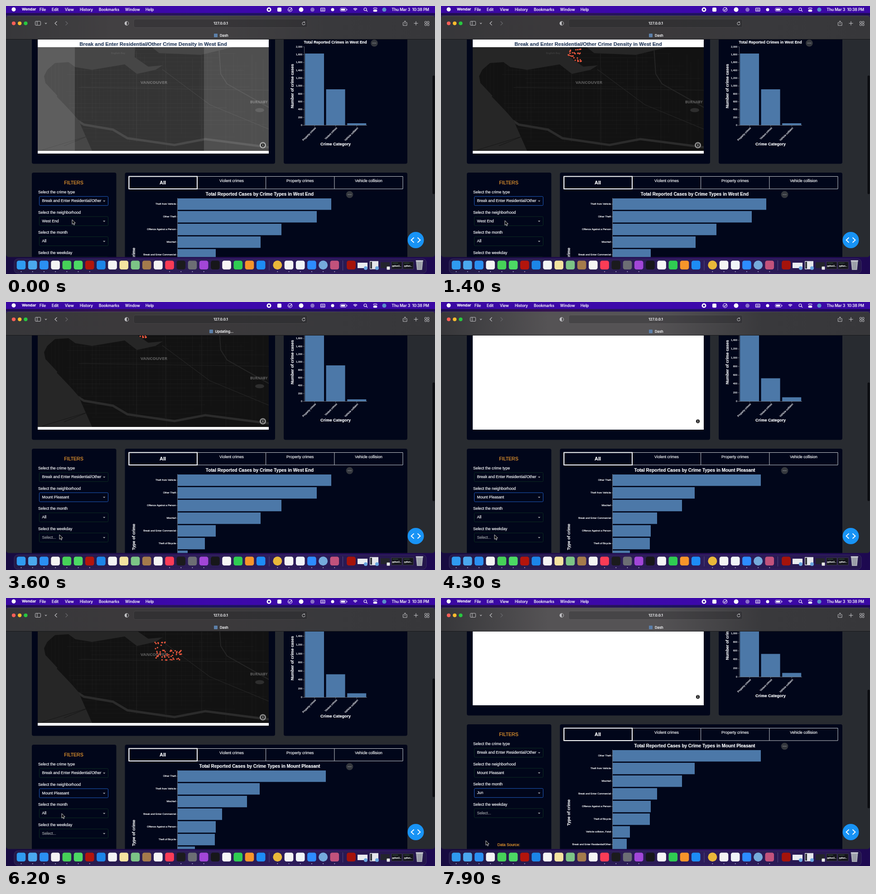
Recreate the animation shown at these times as an HTML page with a canvas. Size 947 by 592 pixels, loop 8000 ms.

```html
<!DOCTYPE html>
<html lang="en">
<head>
<meta charset="utf-8">
<title>Crime dashboard</title>
<style>
  html, body { margin: 0; width: 100%; height: 100%; overflow: hidden; background: #1c0f52; }
  canvas { display: block; width: 947px; height: 592px; }
</style>
</head>
<body>
<canvas id="stage"></canvas>
<script>
const W = 947, H = 592, LOOP = 8000;
const SANS = '"Liberation Sans", Arial, sans-serif', UI = 'Inter, Roboto, sans-serif';
const BAR = '#4c78a8', PANEL = '#01061a', ORANGE = '#f5a030', INK = '#f4f5f7', AXIS = '#85888f';
const canvas = document.getElementById('stage'), c = canvas.getContext('2d');
const dpr = window.devicePixelRatio || 1;
canvas.width = W * dpr;
canvas.height = H * dpr;

// ---------- helpers ----------
const clamp = v => Math.min(1, Math.max(0, v));
const ease = v => { v = clamp(v); return v * v * (3 - 2 * v); };
function text(s, x, y, size, o = {}) {
  c.save();
  c.translate(x, y);
  c.rotate(o.turn || 0);
  c.font = `${o.weight || 400} ${size}px ${o.font || SANS}`;
  c.textAlign = o.align || 'left';
  c.textBaseline = 'middle';
  c.fillStyle = c.strokeStyle = o.color || INK;
  c.lineWidth = .22; // slightly heavier glyphs
  c.lineJoin = 'round';
  c.fillText(s, 0, 0);
  c.strokeText(s, 0, 0);
  c.restore();
}
const title = (s, x, y, size, o) => text(s, x, y, size, { weight: 700, align: 'center', ...o });
function rect(x, y, w, h, fill, r = 0) {
  c.fillStyle = fill;
  c.beginPath();
  c.roundRect(x, y, w, h, r);
  c.fill();
}
function frame(x, y, w, h, color, lw = 1, r = 0) {
  c.strokeStyle = color;
  c.lineWidth = lw;
  c.beginPath();
  c.roundRect(x, y, w, h, r);
  c.stroke();
}
function disc(x, y, r, fill) {
  c.fillStyle = fill;
  c.beginPath();
  c.arc(x, y, r, 0, 7);
  c.fill();
}
function ring(x, y, r, color, lw = 1, a = 0, b = 6.2832) {
  c.strokeStyle = color;
  c.lineWidth = lw;
  c.beginPath();
  c.arc(x, y, r, a, b);
  c.stroke();
}
function trace(pts) {
  c.beginPath();
  for (let i = 0; i < pts.length; i += 2) c.lineTo(pts[i], pts[i + 1]);
}
function line(pts, color, lw = 1) {
  trace(pts);
  c.strokeStyle = color;
  c.lineWidth = lw;
  c.stroke();
}
function shape(pts, fill) {
  trace(pts);
  c.closePath();
  c.fillStyle = fill;
  c.fill();
}
function clip(x, y, w, h, r = 0) {
  c.save();
  c.beginPath();
  c.roundRect(x, y, w, h, r);
  c.clip();
}
function blend(x0, x1, ...colors) {
  const g = c.createLinearGradient(x0, 0, x1, 0);
  colors.forEach((k, i) => g.addColorStop(i / (colors.length - 1), k));
  return g;
}
function random(seed) {
  return () => (seed = (seed * 16807) % 2147483647) / 2147483647;
}

// ---------- timeline ----------
const OPEN_HOOD = 1700, PICK_HOOD = 3500, NEW_BARS = 3900, NEW_TOTALS = 4100, NEW_MAP = 4200,
  OPEN_MONTH = 6300, PICK_MONTH = 7600, CLEAR_MAP = 7800;
const within = (t, a, b) => t >= a && t < b;
const hoodAt = (t, change) => t < change ? 'West End' : 'Mount Pleasant';
const scrollAt = t => t < OPEN_HOOD ? 0 : t < OPEN_MONTH ? 44 : 89;

// each move: start, end, x, y
const MOVES = [[700, 1400, 141, 474], [1900, 2200, 136, 486], [2500, 3300, 118, 514],
  [5500, 6200, 123, 476], [6700, 7200, 99, 536]];
function cursorAt(t) {
  let x = 146, y = 472;
  for (const [a, b, tx, ty] of MOVES) {
    const k = ease((t - a) / (b - a));
    x += (tx - x) * k;
    y += (ty - y) * k;
  }
  return [x, y];
}
// white veil over map tiles that take `span` ms to appear
function veil(t, span) {
  const shown = t < NEW_MAP ? -337 : t < CLEAR_MAP ? NEW_MAP + 100 : LOOP;
  return clamp(1 - (t - shown) / span);
}

// ---------- data ----------
const HOODS = ['West End', 'Central Business District', 'Grandview-Woodland', 'Mount Pleasant',
  'Strathcona', 'Kensington-Cedar Cottage'];
const MONTHS = 'All Jan Feb Mar Apr May Jun Jul Aug'.split(' ');
const THEFT = 'Theft from Vehicle', OTHER = 'Other Theft', PERSON = 'Offence Against a Person',
  HARM = 'Mischief', SHOP = 'Break and Enter Commercial', BIKE = 'Theft of Bicycle',
  FATAL = 'Vehicle collision, Fatal', HOME = 'Break and Enter Residential/Other';
const AREAS = {
  'West End': {
    types: [THEFT, OTHER, PERSON, HARM, SHOP, BIKE, HOME, FATAL],
    bars: [339, 307, 229, 183, 84, 60, 22, 16],
    max: 2000, totals: [1827, 916, 52]
  },
  'Mount Pleasant': {
    types: [OTHER, THEFT, HARM, SHOP, PERSON, BIKE, FATAL, HOME],
    bars: [327, 181, 153, 98, 84, 82, 38, 31],
    max: 1800, totals: [1758, 529, 93]
  }
};
function scatter(seed, n, x, y, w, h, inside) {
  const rnd = random(seed), out = [];
  while (out.length < n) {
    const u = rnd(), v = rnd();
    if (inside(u, v)) out.push([x + u * w, y + v * h]);
  }
  return out;
}
const DOTS = {
  'West End': scatter(41, 30, 281, 95, 29, 33, (u, v) => v < .55 + u * .5),
  'Mount Pleasant': scatter(23, 58, 329, 141, 59, 40, (u, v) => v > .45 || u < .12 || (u < .38 && v < .3))
};

// ---------- map ----------
const LAND = [84, 155, 91, 141, 108, 126, 138, 124, 153, 135, 190, 141, 262, 129, 289, 150, 330, 141,
  346, 131, 314, 134, 284, 113, 285, 91, 322, 91, 338, 104, 430, 108, 500, 91, 580, 91, 580, 320,
  190, 320, 160, 252, 118, 203, 87, 170];
function city() {
  rect(70, 91, 510, 229, '#262626');
  line([113, 199, 160, 248], '#131313', 3);
  line([80, 318, 182, 287, 128, 309], '#181818', 1.2);
  c.save();
  shape(LAND, '#121212');
  c.clip();
  const rnd = random(7), street = () => `rgba(255,255,255,${.015 + rnd() * .035})`;
  for (let x = 92; x < 580; x += 8.2) {
    const y = 92 + rnd() * 50;
    line([x, y, x, y + 110 + rnd() * 90], street(), .8);
  }
  for (let y = 96; y < 318; y += 9.2) line([130 + rnd() * 60, y, 400 + rnd() * 190, y], street(), .8);
  for (const x of [288, 352, 432]) line([x, 100, x, 300], '#202020');
  line([160, 180, 580, 186], '#222', 1.2);
  line([345, 140, 450, 218, 580, 272], '#242424', 1.2);
  line([470, 91, 474, 150, 488, 172, 580, 224], '#252525', 2);
  line([150, 248, 172, 262, 236, 273, 268, 292, 372, 307, 440, 294, 580, 312], '#2b2b2b', 5);
  c.restore();
  c.fillStyle = '#2e2e2e';
  c.beginPath();
  c.ellipse(560, 230, 10, 4.5, 0, 0, 7);
  c.fill();
  const label = { font: '"Open Sans", sans-serif', weight: 700, color: '#585858' };
  text('VANCOUVER', 297, 169.5, 9.6, label);
  text('BURNABY', 539, 212.5, 7.9, label);
  text('English Bay', 232, 105, 5.5, { ...label, color: '#3a3a3a' });
}
function mapCard(t) {
  const hood = hoodAt(t, NEW_MAP);
  rect(70, 40, 510, 286, '#fff');
  title(`${HOME} Crime Density in ${hood}`, 325, 85.2, 11.15, { color: '#2a3f5f' });
  clip(70, 91, 510, 229);
  city();
  const edges = [70, 152, 437, 580];
  for (let i = 0; i < 3; i++)
    rect(edges[i], 91, edges[i + 1] - edges[i], 229, `rgba(255,255,255,${veil(t, i === 1 ? 395 : 455)})`);
  if (within(t, 400, NEW_MAP) || within(t, NEW_MAP + 300, CLEAR_MAP))
    for (const [x, y] of DOTS[hood]) disc(x, y, 1.6, '#ee583e');
  disc(567, 307.5, 7, 'rgba(255,255,255,.5)');
  disc(567, 307.5, 4.2, '#222');
  rect(566.4, 306.8, 1.3, 3.2, '#ddd');
  disc(567, 305.3, .8, '#ddd');
  c.restore();
}

// ---------- charts ----------
function moreButton(x, y) {
  disc(x, y, 7.8, '#34373d');
  for (const d of [-3, 0, 3]) disc(x + d, y, 1, '#85888e');
}
function totals(hood) {
  const { max, totals } = AREAS[hood], zero = 263.5, px = 173.5 / max;
  title(`Total Reported Crimes in ${hood}`, 727, 80.5, 8.37);
  moreButton(813, 82);
  for (let v = 0; v <= max; v += 200) {
    const y = zero - v * px;
    text(v.toLocaleString('en-US'), 654, y, 5.6, { align: 'right' });
    line([655.5, y, 658.5, y], AXIS, .7);
  }
  ['Property crimes', 'Violent crimes', 'Vehicle collision'].forEach((s, i) => {
    const x = 660 + i * 46.6, h = totals[i] * px;
    rect(x, zero - h, 42, h, BAR);
    line([x + 21, zero, x + 21, zero + 3], AXIS, .7);
    text(s, x + 23.5, 269, 5.7, { align: 'right', turn: -Math.PI / 4 });
  });
  line([658.5, 90, 658.5, zero, 797, zero], AXIS, .7);
  title('Crime Category', 727.5, 306, 9);
  title('Number of crime cases', 633, 177, 8.9, { turn: -Math.PI / 2 });
}
function breakdown(hood) {
  const { types, bars } = AREAS[hood];
  frame(271, 376.5, 605, 27.5, '#c9ccd0');
  ['Violent crimes', 'Property crimes', 'Vehicle collision'].forEach((s, i) => {
    const x = 422.3 + i * 151.3;
    line([x, 377, x, 404], '#c9ccd0');
    text(s, x + 75.6, 386.5, 8.6, { align: 'center' });
  });
  frame(271.5, 376.5, 150.5, 27.5, '#fff', 2);
  title('All', 346, 390.7, 11);
  title(`Total Reported Cases by Crime Types in ${hood}`, 560, 415.8, 10);
  moreButton(758.5, 416.5);
  types.forEach((s, i) => {
    const y = 425 + i * 28;
    rect(379, y, bars[i], 25.3, BAR);
    text(s, 375, y + 12.6, 5.6, { align: 'right' });
    line([375.8, y + 12.6, 378.5, y + 12.6], AXIS, .7);
  });
  line([378.5, 424, 378.5, 660], AXIS, .7);
  title('Type of crime', 283, 563, 9, { turn: -Math.PI / 2 });
}

// ---------- filters ----------
function selectBox(i, label, value, state) {
  const y = 430.7 + i * 44.5, d = state === 'open' ? -1 : 1;
  text(label, 71, y - 19, 8.7);
  frame(73.5, y - 10, 152, 20, { open: '#8d9197', focus: '#1f5cc0' }[state] || '#0d2c22', 1, 2);
  text(value, 79.5, y, 8.6, { color: value === 'Select...' ? '#9a9da2' : INK });
  shape([214, y - d, 219.4, y - d, 216.7, y + 1.8 * d], '#a5a8ad');
}
function menu(i, items, hoverY, shift) {
  const top = 443.9 + i * 44.5, row = 19.5;
  const hover = Math.floor((hoverY - 444 + shift) / row);
  rect(74.5, top, 156, 140, PANEL);
  clip(75, top, 150, 140);
  items.forEach((s, k) => {
    const y = top + 10.3 + k * row - shift;
    if (k === hover) rect(75, y - row / 2, 150, row, '#0a1930');
    text(s, 77.5, y, 8.6, { weight: k ? 400 : 700 });
  });
  c.restore();
  rect(225.5, top + 28, 4, 112, '#4c4f55', 2);
  frame(74.5, top, 156, 140, '#c4c7cb');
}
function filters(t) {
  const hoodOpen = within(t, OPEN_HOOD, PICK_HOOD), monthOpen = within(t, OPEN_MONTH, PICK_MONTH);
  const active = t < OPEN_HOOD ? 0 : t < OPEN_MONTH ? 1 : 2;
  const values = [HOME, hoodAt(t, PICK_HOOD), t < PICK_MONTH ? 'All' : 'Jun', 'Select...'];
  text('FILTERS', 149.5, 390.7, 10.5, { align: 'center', color: ORANGE });
  ['crime type', 'neighborhood', 'month', 'weekday'].forEach((s, i) =>
    selectBox(i, `Select the ${s}`, values[i], i !== active ? '' : hoodOpen || monthOpen ? 'open' : 'focus'));
  text('Data Source:', 149.5, 634.5, 8.6, { align: 'center', color: ORANGE });
  const hoverY = cursorAt(t - 200)[1];
  if (hoodOpen) menu(1, HOODS, hoverY, 0);
  if (monthOpen) menu(2, MONTHS, hoverY, 39 * ease((t - 6700) / 500));
}

// ---------- desktop ----------
function menuBar() {
  rect(0, 0, W, 24, blend(0, W, '#1d0c52', '#34134f', '#1d1560', '#220c60', '#1d0a55'));
  rect(0, 0, W, 15.5, blend(0, W, '#3a08a2', '#3d08ac', '#3a08a4'));
  disc(17, 7.5, 4.5, '#fff');
  text('Wendar', 35, 8, 8.2, { font: UI, weight: 700 });
  const items = { File: 74, Edit: 101, View: 130, History: 163, Bookmarks: 205, Window: 263, Help: 308 };
  for (const s in items) text(s, items[s], 8, 8.4, { font: UI, weight: 500 });
  disc(580.5, 8, 5, '#fff');
  rect(578.5, 6, 4, 4, '#3a0d9c');
  rect(599, 3.5, 9, 9, '#fff', 2);
  ring(627, 8, 4.5, '#fff', 1.2);
  line([624.5, 8, 626.5, 10, 631, 4], '#fff', 1.2);
  disc(651.5, 8, 5, '#fff');
  disc(676.5, 8, 4.5, '#8a70c8');
  frame(694.5, 4.5, 9.5, 7, '#fff', 1.1, 1);
  for (const y of [7, 9.5]) line([696, y, 702.5, y], '#fff');
  disc(721, 8, 3.5, '#fff');
  frame(738, 4.5, 13, 7, '#d8d0f0', 1, 2);
  rect(739.5, 6, 9, 4, '#fff', 1);
  rect(752, 6.5, 1.3, 3, '#d8d0f0');
  for (const r of [2, 4, 6]) ring(771, 11, r, '#fff', 1.2, -2.35, -.79);
  ring(793, 7.2, 3, '#fff', 1.1);
  line([795.2, 9.4, 798, 12], '#fff', 1.2);
  frame(811, 4, 8, 3, '#fff', 1, 1.5);
  rect(810.5, 8.5, 9, 4, '#fff', 2);
  disc(835, 8, 4.6, '#5a8fc8');
  text('Thu Mar 3  10:38 PM', 934, 8, 8.4, { font: UI, weight: 500, align: 'right' });
}
function toolbar(t) {
  // the bar lets some of the page below shine through
  const v = 57 + 26 * veil(t, 455), mid = `rgb(${v + 2},${v},${v + 2})`, g = '#c3c3c6';
  c.fillStyle = blend(0, W, '#37373a', mid, mid, '#39393c', '#37373a');
  c.beginPath();
  c.roundRect(0, 21.5, W, 52.5, [6, 6, 0, 0]);
  c.fill();
  line([0, 21.8, W, 21.8], '#5c5b62', .7);
  line([0, 73.5, W, 73.5], '#17181b');
  ['#fe5f57', '#febc2e', '#28c840'].forEach((k, i) => disc(17 + i * 13.2, 38.3, 4.1, k));
  frame(64.5, 33.8, 12, 8.8, g, 1, 1.5);
  line([68.8, 34, 68.8, 42.5], g);
  line([86, 37, 88, 39.3, 90, 37], g, 1.1);
  line([112.5, 34, 108, 38.3, 112.5, 42.6], g, 1.2);
  line([131.5, 34, 136, 38.3, 131.5, 42.6], '#68686c', 1.2);
  ring(266.5, 38.3, 4.3, g);
  c.fillStyle = g;
  c.beginPath();
  c.arc(266.5, 38.3, 4.3, Math.PI / 2, Math.PI * 1.5);
  c.fill();
  rect(282, 29, 383.5, 18.5, 'rgba(20,20,24,.22)', 4);
  frame(282, 29, 383.5, 18.5, 'rgba(255,255,255,.1)', .7, 4);
  text('127.0.0.1', 474, 38.8, 8.1, { font: UI, weight: 500, align: 'center' });
  ring(657, 38.7, 3.2, g, 1, 0, 5.2);
  shape([657.5, 34, 660.8, 35.8, 657.8, 37.6], g);
  line([878.5, 36.5, 876.5, 36.5, 876.5, 43, 885, 43, 885, 36.5, 883, 36.5], g);
  line([880.8, 40, 880.8, 33], g);
  line([878.6, 35, 880.8, 32.8, 883, 35], g);
  line([900.5, 38.3, 909.5, 38.3], g, 1.1);
  line([905, 33.8, 905, 42.8], g, 1.1);
  for (const x of [924.5, 930]) for (const y of [34, 39.4]) frame(x, y, 3.9, 3.9, g, 1, .8);
  const busy = within(t, PICK_HOOD, NEW_TOTALS) || within(t, PICK_MONTH, CLEAR_MAP);
  rect(busy ? 449 : 459, 61, 8, 8, '#5c7fa8', 1);
  text(busy ? 'Updating...' : 'Dash', busy ? 461.5 : 472, 65.3, 7.7, { font: UI, weight: 500 });
}
const APPS = ('#2f9bf0 #4aa8ee #2a8ff2 #f4f4f4 #46d158 #4cd964 #b3150c #1c85e8 #f4f4f4 #f4e3a0 #7cc486 ' +
  '#a47b4c #f4f4f4 #fa3c56 #1b1b1d #6c6e74 #a246d8 #17171a #f6f6f6 #2fcc52 #f7952a #1d8cf5').split(' ');
const RECENT = '#e9b83a #f4f4f4 #f0f4f8 #2d8cff #75aadb #c2527c'.split(' ');
function dock() {
  rect(0, 550, W, 42, blend(0, W, '#170b40', '#220c50', '#2a0c5e', '#1d0950'));
  rect(18, 558.5, 910, 32, blend(18, 928, '#231a48', '#2b1d54', '#2d1c5a', '#24164c'), 8);
  frame(18, 558.5, 910, 32, '#43376e', .7, 8);
  const icon = (k, x) => rect(x - 9.8, 562.5, 19.6, 19.6, k, 4.5);
  APPS.forEach((k, i) => icon(k, 33.5 + i * 25.2));
  RECENT.forEach((k, i) => i % 4 ? icon(k, 599.3 + i * 25.2) : disc(599.3 + i * 25.2, 572.3, 10, k));
  icon('#a5130b', 762);
  for (let i = 0; i < 28; i++)
    if (i < 7 || (i > 12 && i < 17) || i > 21) disc(33.5 + i * 25.2 + (i > 21 ? 11.4 : 0), 586.7, 1, '#b8b4d8');
  for (const x of [581, 743.5]) line([x, 562, x, 584], '#544a80');
  rect(776, 567, 22, 12, '#e9ecf0');
  rect(803, 563.5, 19, 18, '#e4e6ea');
  rect(804, 565, 4, 15, '#34363c');
  for (const x of [794, 819]) disc(x, 579, 4, '#6aa6e0');
  rect(827, 566, 20, 13, '#23242c');
  rect(840.5, 575.5, 7, 7, '#e8e8e8', 1);
  ['python3...', 'python...'].forEach((s, i) => {
    const x = 862.5 + i * 25.2;
    rect(x - 11.5, 565, 23, 16, '#14151b');
    frame(x - 11.5, 565, 23, 16, '#55565e', .6);
    line([x - 9, 568, x + 3, 568], '#4f7a5a', .8);
    text(s, x, 575, 4.6, { align: 'center' });
  });
  shape([905, 563, 920.5, 563, 918.5, 583, 907, 583], '#a8abb4');
  rect(904.5, 561.8, 16.5, 2.2, '#d5d7dd', 1);
  for (const d of [-3, 0, 3]) line([912.8 + d, 566, 912.8 + d * .8, 581], '#7e818c', .8);
}
function pointer(x, y) {
  c.save();
  c.translate(x, y);
  trace([0, 0, 0, 10.2, 2.3, 8.2, 3.9, 11.8, 5.6, 11, 4, 7.5, 7.2, 7.3]);
  c.closePath();
  c.fillStyle = '#050505';
  c.fill();
  c.strokeStyle = '#e6e6e6';
  c.lineWidth = .9;
  c.stroke();
  c.restore();
}

// ---------- scene ----------
function draw(t) {
  const scroll = scrollAt(t);
  c.setTransform(dpr, 0, 0, dpr, 0, 0);
  menuBar();
  dock();
  clip(0, 60, W, 494.5, [0, 0, 6, 6]);
  rect(0, 60, W, 500, '#282b30');
  c.save();
  c.translate(0, -scroll);
  rect(57, 20, 537, 328.5, PANEL, 4);
  rect(613, 20, 273, 328.5, PANEL, 4);
  rect(57, 368, 186.5, 340, PANEL, 4);
  rect(262.5, 368, 623.5, 340, PANEL, 4);
  mapCard(t);
  totals(hoodAt(t, NEW_TOTALS));
  breakdown(hoodAt(t, NEW_BARS));
  filters(t);
  c.restore();
  rect(941.5, 153.5 + scroll * .55, 5, 262, '#0b0c10', 2.5);
  disc(904.5, 517, 18, '#1893f5');
  for (const d of [-1, 1]) line([904.5 + d * 4, 511.5, 904.5 + d * 10, 517, 904.5 + d * 4, 522.5], '#fff', 1.8);
  c.restore();
  toolbar(t);
  pointer(...cursorAt(t));
}

const start = performance.now();
let last = -1;
function tick(now) {
  const t = Math.floor(Math.max(0, now - start) % LOOP / 100) * 100;
  if (t !== last) draw(last = t);
  requestAnimationFrame(tick);
}
draw(0);
requestAnimationFrame(tick);
</script>
</body>
</html>
```
